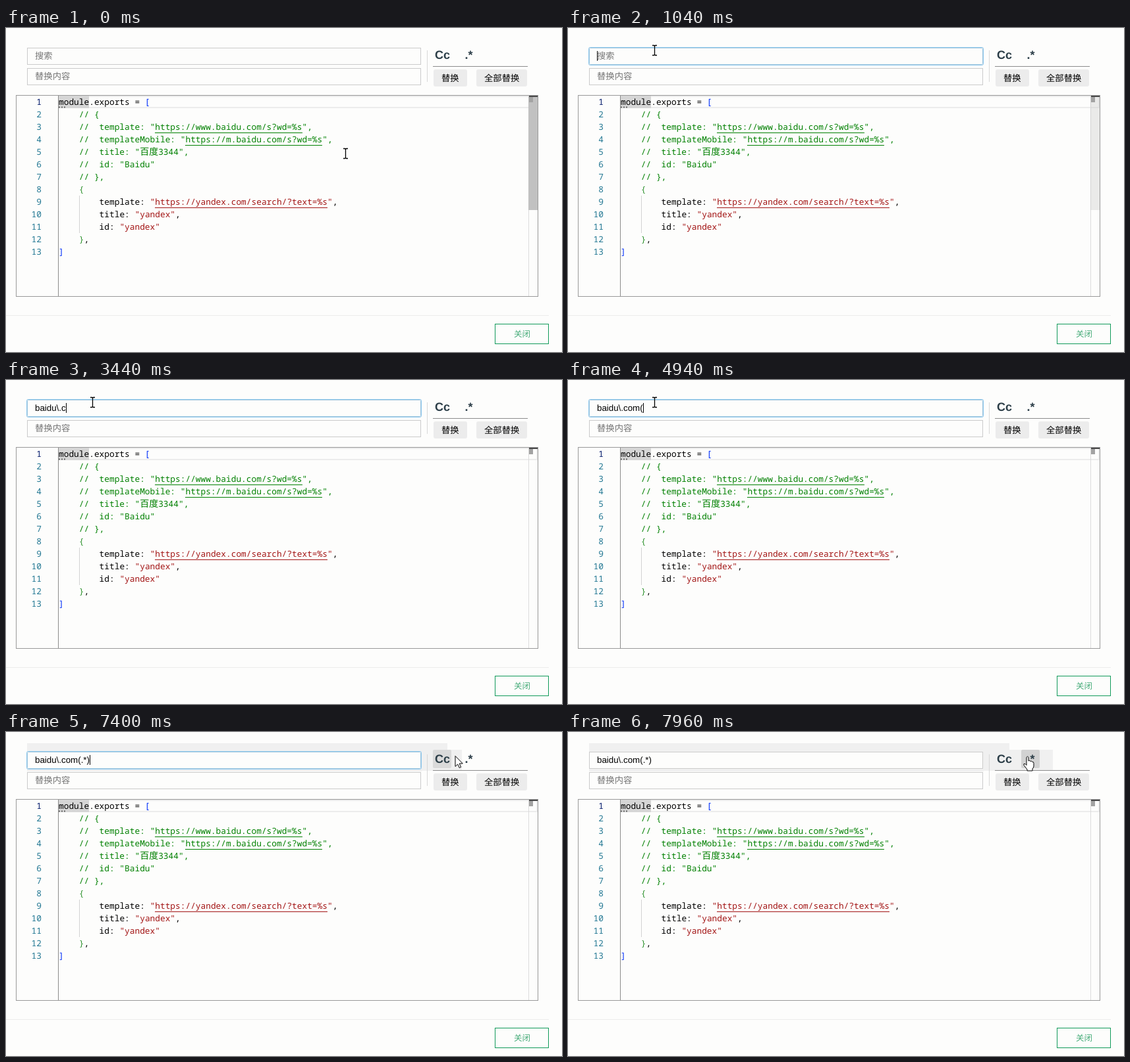
Animation, 844 px wide and 493 px high, one loop 8000 ms. Source, as an HTML page:

```html
<!DOCTYPE html>
<html lang="zh">
<head>
<meta charset="utf-8">
<style>
html, body { margin: 0; width: 100%; height: 100%; overflow: hidden; background: #fdfdfc; }
svg { display: block; }
text { white-space: pre; text-rendering: geometricPrecision; font: 13.33px "Liberation Sans", "Noto Sans CJK SC", "Noto Sans CJK", sans-serif; }
.code text { font: 500 12.83px "Noto Sans Mono", "Noto Sans CJK SC", "Noto Sans CJK", monospace; }
.hint { fill: #757575; }
.bold { font-size: 18px; font-weight: bold; fill: #2c3e48; }
.input { fill: #fdfdfc; stroke: #cbcbcb; }
</style>
</head>
<body>
<svg width="844" height="493" viewBox="0 0 844 493">
  <g id="smudge" fill="#f0f0f0">
    <path d="M32 17H670V27H631V60H32z"/>
    <rect id="trail" x="631" y="27" height="32"/>
  </g>

  <rect class="input" x="32.5" y="30.5" width="597" height="25"/>
  <rect class="input" x="32.5" y="61.5" width="597" height="25"/>
  <g id="focus">
    <rect x="31.5" y="29.5" width="599" height="27" rx="2" fill="#fdfdfc" stroke="#8ec8ee"/>
    <rect x="32.5" y="30.5" width="597" height="25" rx="1" fill="none" stroke="#a6c8dc"/>
  </g>
  <text id="placeholder" class="hint" x="44" y="47">搜索</text>
  <text class="hint" x="44" y="78">替换内容</text>
  <text id="query" x="44" y="47"></text>
  <rect id="caret" y="35" width="1" height="15"/>

  <path d="M639.5 34V82" stroke="#d8d8d8"/>
  <path d="M648 58.5H792" stroke="#8c8c8c"/>
  <rect id="caseHover" x="648" y="27" width="28" height="28" rx="2" fill="#dadada"/>
  <rect id="regexHover" x="688" y="27" width="28" height="28" rx="2" fill="#d2d2d2"/>
  <text class="bold" x="651" y="47">Cc</text>
  <text class="bold" x="696.5" y="47">.*</text>
  <rect x="649" y="63" width="51" height="26" rx="3" fill="#ececec"/>
  <rect x="714" y="63" width="77" height="26" rx="3" fill="#ececec"/>
  <text x="661" y="81">替换</text>
  <text x="726" y="81">全部替换</text>

  <path d="M80 104H806V121H80" fill="none" stroke="#ececec" stroke-width="2"/>
  <rect x="80" y="103" width="46" height="19" fill="#d6d6d6"/>
  <path d="M80 120.5H91" stroke="#666" stroke-width="2" stroke-dasharray="2 2"/>
  <path d="M111.5 255V312" stroke="#d3d3d3"/>
  <path d="M793.5 103V408" stroke="#dcdcdc"/>
  <g id="matches" fill="#f7c9ab">
    <rect x="318.7" y="142" width="38.5" height="19"/>
    <rect x="349.5" y="161" width="38.5" height="19"/>
    <rect x="180.1" y="199" width="38.5" height="18"/>
  </g>
  <g id="code" class="code"></g>
  <path d="M226 159.5H450M272 178.5H480" stroke="#008000"/>
  <path d="M226 273.5H488" stroke="#a31515"/>
  <rect id="slider" x="793" y="104" width="14" height="173" fill="#c1c1c1"/>
  <rect x="794" y="105" width="6" height="8" fill="#a3a3a3"/>
  <path d="M79.5 103V408" stroke="#8c8c8c"/>
  <rect x="15.5" y="102.5" width="792" height="306" fill="none" stroke="#999"/>
  <path d="M794 104H807" stroke="#4a4a4a" stroke-width="2"/>

  <path d="M0 437.5H824" stroke="#ececec"/>
  <rect x="742.5" y="450.5" width="81" height="30" fill="none" stroke="#119a5a"/>
  <text x="771" y="470" style="font-size:12.5px" fill="#45ab78">关闭</text>

  <g id="cursor">
    <path id="beam" d="M-3.5 -7.5H-1L0 -6.5L1 -7.5H3.5M0 -7V7M-3.5 7.5H-1L0 6.5L1 7.5H3.5" fill="none" stroke="#000" stroke-width="1.3"/>
    <path id="arrow" d="M0 0V16L3.7 12.5L6.2 18L8.6 17L6.2 11.5H11.3z" fill="#fff" stroke="#000"/>
    <path id="hand" d="M-1.5 1.5Q0 -1 1.5 1.5V7Q3.5 5.5 4.5 7.5Q6.5 6.5 7.2 8.5Q9.5 8 9.5 10.5V15Q9.5 17 7.5 19V22H-0.5V20L-5.5 13.5Q-6.5 10.5 -3.5 11.5L-1.5 13.5z" fill="#fff" stroke="#000"/>
  </g>
</svg>
<script>
const LOOP = 8000;
const $ = id => document.getElementById(id);
const set = (id, name, value) => $(id).setAttribute(name, value);
const show = (id, on) => set(id, "visibility", on ? "visible" : "hidden");
const clamp = v => Math.min(1, Math.max(0, v));
const ramp = (t, from, to) => clamp((t - from) / (to - from));

// Each line: indent, then runs whose first letter picks the colour.
const COLORS = { k: "#000", g: "#008000", r: "#a31515", b: "#0431fa", n: "#319331" };
const LINES = [
  [0, "kmodule.exports = ", "b["],
  [4, "g// {"],
  [4, 'g//  template: "https://www.baidu.com/s?wd=%s",'],
  [4, 'g//  templateMobile: "https://m.baidu.com/s?wd=%s",'],
  [4, 'g//  title: "百度3344",'],
  [4, 'g//  id: "Baidu"'],
  [4, "g// },"],
  [4, "n{"],
  [8, "ktemplate: ", 'r"https://yandex.com/search/?text=%s"', "k,"],
  [8, "ktitle: ", 'r"yandex"', "k,"],
  [8, "kid: ", 'r"yandex"'],
  [4, "n}", "k,"],
  [0, "b]"]
];
const run = s => `<tspan fill="${COLORS[s[0]]}">${s.slice(1).replace(/[一-龥]+/, '<tspan font-size="14">$&</tspan>')}</tspan>`;
$("code").innerHTML = LINES.map(([indent, ...runs], i) => {
  const y = 117 + 19 * i;
  return `<text x="54" y="${y}" text-anchor="end" fill="${i ? "#237893" : "#0b216f"}">${i + 1}</text>` +
    `<text x="${80 + 7.7 * indent}" y="${y}">${runs.map(run).join("")}</text>`;
}).join("");

const QUERY = "baidu\\.com(.*)";
const KEY_TIMES = [1870, 1960, 2050, 2140, 2230, 2810, 3060, 3440, 3550, 3930, 4940, 5160, 5670, 6300];
const CARET_GAPS = [[1490, 1870], [2770, 2810], [4500, 4940], [6180, 6300], [6790, 7300]];
const PATH = [[440, 515.5, 191], [1020, 131.5, 34], [6960, 131.5, 34], [7400, 682, 36.5], [7760, 697.5, 37]];

function pointer(t) {
  let [, x, y] = PATH[0];
  for (let i = 1; i < PATH.length; i++) {
    const p = ramp(t, PATH[i - 1][0], PATH[i][0]);
    const e = p * p * (3 - 2 * p);
    x += (PATH[i][1] - PATH[i - 1][1]) * e;
    y += (PATH[i][2] - PATH[i - 1][2]) * e;
  }
  return [x, y];
}

function pointerShape(x, y) {
  const inside = (l, t, r, b) => x >= l && x <= r && y >= t && y <= b;
  if (inside(80, 103, 793, 408) || inside(32, 30, 630, 56) || inside(32, 61, 630, 87)) return "beam";
  return inside(648, 27, 676, 55) || inside(688, 27, 716, 55) ? "hand" : "arrow";
}

function draw(t) {
  const [x, y] = pointer(t);
  const shape = pointerShape(x, y);
  set("cursor", "transform", `translate(${x} ${y})`);
  for (const id of ["beam", "arrow", "hand"]) show(id, id === shape);

  const typed = KEY_TIMES.filter(k => k <= t).length;
  const focused = t >= 1000 && t < 7820;
  $("query").textContent = QUERY.slice(0, typed);
  show("placeholder", !typed);
  show("focus", focused);
  show("caret", focused && !CARET_GAPS.some(([a, b]) => t >= a && t < b));
  set("caret", "x", Math.round(44 + (typed ? $("query").getComputedTextLength() : 0)));

  show("matches", t >= 2420 && t < 3000);
  set("slider", "opacity", t < 1310 ? 1 - 0.67 * ramp(t, 720, 1040) : 0);
  show("smudge", t >= 7080);
  set("trail", "width", t < 7460 ? 61 : 105);
  set("caseHover", "opacity", ramp(t, 7220, 7320) - ramp(t, 7420, 7520));
  set("regexHover", "opacity", ramp(t, 7480, 7600));
}

function frame() {
  draw(performance.now() % LOOP);
  requestAnimationFrame(frame);
}
frame();
</script>
</body>
</html>
```
